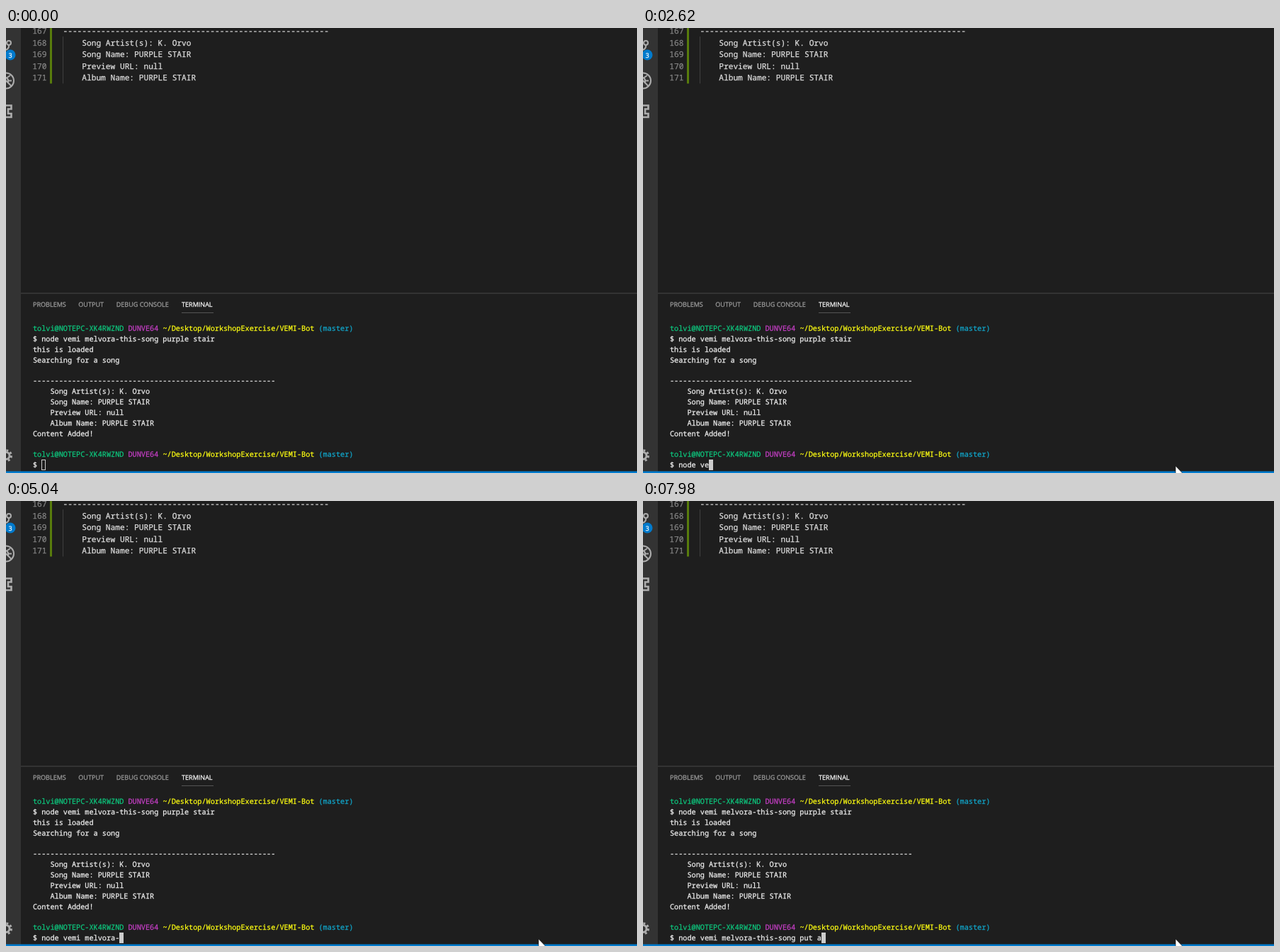
These frames come from a looping animation (891x629 px, 8 s). An HTML page:

```html
<!DOCTYPE html>
<html lang="en">
<head>
<meta charset="utf-8">
<title>Terminal typing</title>
<style>
  html, body { margin: 0; width: 100%; height: 100%; overflow: hidden; background: #1e1e1e; }
  svg { display: block; }
  text { white-space: pre; text-rendering: geometricPrecision; fill: currentColor; stroke: currentColor; stroke-width: .25; }
  tspan { fill: currentColor; stroke: currentColor; }
  .code { font: 11.18px "Noto Sans Mono", "DejaVu Sans Mono", monospace; color: #dedede; }
  .term { font: 10.2px "Noto Sans Mono", "DejaVu Sans Mono", monospace; color: #f0f0f0; }
  .num { color: #858585; }
  .tab { font: 9.05px "Open Sans", "Noto Sans", sans-serif; color: #a0a0a0; }
  .active { color: #fff; }
  .icon { fill: none; stroke: #adadad; stroke-width: 2; }
  .user { color: #0dc97f; }
  .host { color: #c53fc5; }
  .path { color: #ff1; }
  .branch { color: #11a8cd; }
</style>
</head>
<body>
<svg width="891" height="629" viewBox="0 0 891 629">
  <rect width="891" height="629" fill="#1e1e1e"/>
  <rect width="21" height="629" fill="#333"/>

  <g class="icon">
    <circle cx="4" cy="21" r="3"/>
    <path d="M4 24v2q0 3 -4 5"/>
    <circle cx="0" cy="74.5" r="11"/>
    <path d="M-8 66.5L8 82.5M1 70.5L6 67M3 74.5H8M0 70q4 2 3 7"/>
    <path d="M0 109.5H7.5V114.5H3V121H7.5V126H0" stroke-width="2.6"/>
    <circle cx="0" cy="604.5" r="5" stroke-width="3"/>
    <circle cx="0" cy="604.5" r="7.5" stroke-width="3" stroke-dasharray="2.95"/>
  </g>
  <circle cx="6" cy="38" r="7.5" fill="#007acc"/>
  <text x="6" y="41.5" text-anchor="middle" class="tab active">3</text>

  <rect x="62" width="3" height="78.5" fill="#587c0c"/>
  <rect x="80" y="12" width="1" height="66.5" fill="#404040"/>
  <g id="editor" class="code"></g>

  <rect x="21" y="374.5" width="870" height="1" fill="#484848"/>
  <text class="tab" x="38" y="394.3">PROBLEMS</text>
  <text class="tab" x="102.3" y="394.3">OUTPUT</text>
  <text class="tab" x="155.7" y="394.3">DEBUG CONSOLE</text>
  <text class="tab active" x="248" y="394.3">TERMINAL</text>
  <rect x="248" y="402" width="45" height="1" fill="#555"/>

  <g id="terminal" class="term"></g>
  <rect id="caret" y="610" height="15"/>
  <rect y="626.5" width="891" height="3" fill="#007acc"/>
  <path id="mouse" d="M0 0V15L3.5 12L6 17L8 16L6 11H10.5Z" fill="#fff" stroke="#111" stroke-width=".6"/>
</svg>
<script>
const $ = id => document.getElementById(id);
const CELL = 6.12, LEFT = 38, ROW = 14.84;

// Baselines sit on whole pixels
function addText(parent, x, y, html, cls = "") {
  const el = document.createElementNS("http://www.w3.org/2000/svg", "text");
  el.setAttribute("x", x);
  el.setAttribute("y", Math.round(y));
  el.setAttribute("class", cls);
  el.innerHTML = html;
  $(parent).append(el);
  return el;
}

const song = [
  "-".repeat(56),
  "    Song Artist(s): K. Orvo",
  "    Song Name: PURPLE STAIR",
  "    Preview URL: null",
  "    Album Name: PURPLE STAIR"
];
song.forEach((line, i) => {
  const y = 8 + i * 16.6;
  addText("editor", 37.3, y, 167 + i, "num");
  addText("editor", 80.5, y, line);
});

const span = (cls, s) => `<tspan class="${cls}">${s}</tspan>`;
const prompt = [
  span("user", "tolvi@NOTEPC-XK4RWZND"),
  span("host", "DUNVE64"),
  span("path", "~/Desktop/WorkshopExercise/VEMI-Bot"),
  span("branch", "(master)")
].join(" ");
const rows = [
  prompt, "$ node vemi melvora-this-song purple stair",
  "this is loaded", "Searching for a song", "",
  ...song, "Content Added!", "", prompt
];
const rowY = i => 428.2 + i * ROW;
rows.forEach((line, i) => addText("terminal", LEFT, rowY(i), line));
const input = addText("terminal", LEFT, rowY(rows.length), "$ ");

// One time per typed character
const command = "node vemi melvora-this-song put a";
const keyTimes = [
  1850, 1930, 2080, 2160, 2310, 2540, 2620, 2700,
  2930, 3080, 3310, 3470, 3620, 3780, 3940, 4180, 4410,
  5040, 5190, 5270, 5350, 5500, 5730, 5890, 6040, 6190, 6270,
  7120, 7520, 7670, 7830, 7830, 7980
];
const FOCUS = 1300;

// Pointer stops: time, x, y
const stops = [
  [0, 744, 640], [690, 744, 624], [770, 746, 614], [840, 748, 609],
  [920, 750, 612], [1000, 751, 616], [1150, 752, 619]
];

function draw() {
  const t = performance.now() % 8000;
  const typed = keyTimes.filter(k => k <= t).length;
  input.textContent = "$ " + command.slice(0, typed);

  const focused = t >= FOCUS, inset = focused ? 0 : .5;
  const attrs = {
    x: Math.round(LEFT + (typed + 2) * CELL) + inset,
    y: 610 + inset,
    width: 6 - 2 * inset,
    height: 15 - 2 * inset,
    fill: focused ? "#ccc" : "none",
    stroke: focused ? "none" : "#ccc"
  };
  for (const name in attrs) $("caret").setAttribute(name, attrs[name]);

  const [, x, y] = stops.filter(s => s[0] <= t).pop();
  $("mouse").setAttribute("transform", `translate(${x} ${y})`);
  requestAnimationFrame(draw);
}
draw();
</script>
</body>
</html>
```
